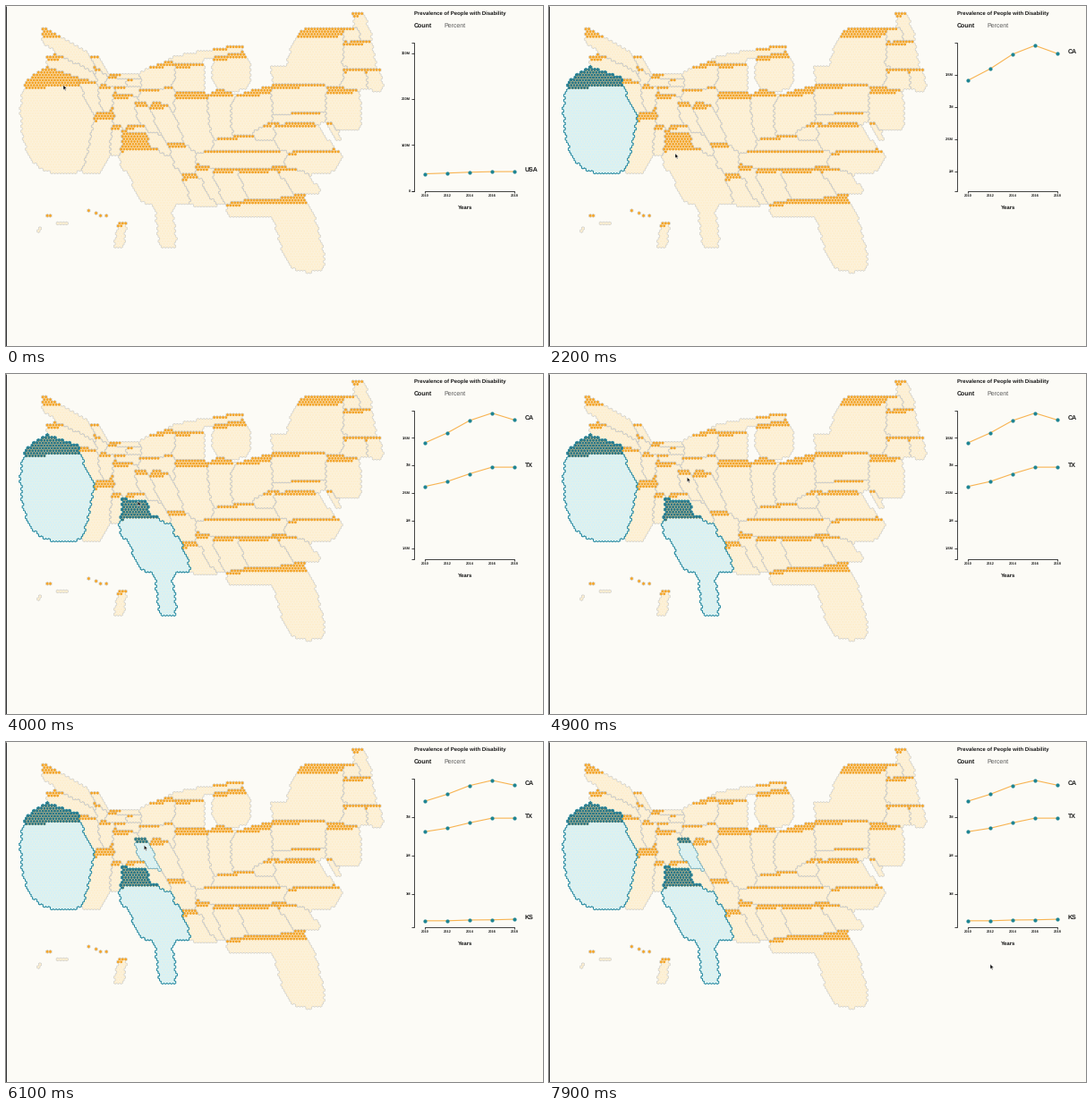
Write a matplotlib script that moves like this. It is 600 px wide and 380 px high and loops after 8 s.

```python
import numpy as np
import matplotlib.pyplot as plt
from matplotlib.animation import FuncAnimation
from matplotlib.patches import PathPatch, Polygon
from matplotlib.path import Path

W, H, DPI = 600, 380, 100
PX = 72 / DPI
BG, INK, ORANGE, TEAL = "#fcfbf6", "#161616", "#f3a52a", "#1f8593"
plt.rcParams.update({"font.family": "Liberation Sans", "text.hinting": "none",
                     "text.hinting_factor": 1})

fig = plt.figure(figsize=(W / DPI, H / DPI), dpi=DPI, facecolor=BG)
ax = fig.add_axes([0, 0, 1, 1])
ax.set(xlim=(0, W), ylim=(H, 0))
ax.axis("off")

# ---- hexagon grid in axial coordinates
DX = 3.3
DY = DX * np.sqrt(3) / 2
SIDES = [(1, 0), (0, 1), (-1, 1), (-1, 0), (0, -1), (1, -1)]
GRID = [(q, r) for r in range(1, 106) for q in range(-r // 2, 132 - r // 2)]


def center(q, r):
    return np.array([DX * (q + r / 2), DY * r])


CENTERS = np.array([center(*c) for c in GRID])
nearest = np.full(len(GRID), 1.03)
names = np.full(len(GRID), "", dtype="U5")


def blob(name, x0, y0, x1, y1, lean=0, tilt=0, power=5):
    """Claim cells in a rounded box: lean shifts its foot, tilt lowers its right end."""
    u, v = ((CENTERS - ((x0 + x1) / 2, (y0 + y1) / 2)) / (x1 - x0, y1 - y0)).T
    u, v = u - v * lean / (x1 - x0), v - u * tilt / (y1 - y0)
    reach = 2 * (abs(u) ** power + abs(v) ** power) ** (1 / power)
    won = reach < nearest
    nearest[won], names[won] = reach[won], name


# west
blob("CA", 18, 71, 101, 186, lean=8, power=2.5)
blob("WA", 41, 41, 103, 61, tilt=38)
blob("OR", 46, 62, 101, 78, tilt=18)
blob("NV", 86, 80, 104, 122, lean=16)
blob("AZ", 92, 111, 117, 187, lean=-16)
blob("UT", 104, 86, 119, 120)
blob("NM", 117, 132, 129, 168)
blob("ID", 100, 64, 112, 88, lean=8)
blob("MT", 98, 55, 110, 80, lean=14)
blob("WY", 110, 78, 134, 90)
blob("ND", 120, 76, 150, 82)
blob("SD", 134, 81, 152, 91)
blob("CO", 119, 94, 146, 136)
blob("NE", 122, 89, 150, 100, tilt=3)
blob("KS", 149, 107, 166, 147, lean=22)
blob("TX", 128, 138, 157, 185)
blob("TX", 139, 160, 198, 222, lean=24)
blob("TX", 168, 208, 187, 269, lean=8)
blob("OK", 134, 133, 161, 141)
blob("OK", 164, 139, 180, 169, lean=22)
# middle
blob("MN", 150, 66, 189, 92, tilt=-14)
blob("IA", 148, 92, 189, 108, tilt=3)
blob("MO", 168, 109, 191, 157, lean=20)
blob("WI", 188, 64, 222, 97)
blob("UP", 183, 50, 263, 59, tilt=-14)
blob("MI", 231, 52, 273, 94, power=3)
blob("IL", 193, 95, 230, 161, lean=14)
blob("IN", 225, 97, 252, 153, lean=2)
blob("OH", 252, 95, 297, 140, tilt=-14)
# south
blob("AR", 183, 153, 211, 186, lean=10, tilt=6)
blob("LA", 201, 186, 230, 224, lean=16)
blob("MS", 216, 177, 236, 222, lean=18)
blob("AL", 236, 184, 264, 221, lean=14)
blob("GA", 264, 179, 317, 217, lean=18, tilt=-6)
blob("SC", 306, 176, 340, 209, lean=30)
blob("NC", 309, 162, 371, 187, lean=-14)
blob("TN", 214, 162, 316, 181)
blob("KY", 229, 147, 300, 163, tilt=2)
blob("FL", 248, 216, 320, 236)
blob("FL", 304, 212, 349, 296, lean=22, power=3.5)
# east
blob("WV", 278, 132, 304, 151, tilt=-10)
blob("VA", 297, 130, 357, 163, lean=24)
blob("MD", 298, 118, 358, 131, tilt=-4)
blob("DE", 362, 129, 371, 151, lean=12)
blob("PA", 297, 85, 358, 124, tilt=-4)
blob("NJ", 357, 89, 396, 139, lean=4, power=3.5)
blob("NY", 317, 25, 376, 88, lean=-18)
blob("NY", 298, 66, 384, 89, lean=6)
blob("ME", 391, 8, 405, 38, lean=10)
blob("VT", 376, 25, 396, 41)
blob("MA", 376, 38, 411, 69, lean=6)
blob("CT", 374, 69, 403, 93)
blob("RI", 403, 70, 420, 94, lean=4)
# islands
blob("AK", 123, 242, 133, 270, lean=-4)
blob("isles", 57, 241, 68, 245, tilt=2)
blob("isles", 34, 248, 39, 254, lean=-3)
for i in range(4):
    blob("HI", 46 + 2 * i, 234 - i, 48 + 2 * i, 236 - i)
    blob("HI", 91 + 7 * i, 228 + 2 * i, 94 + 7 * i, 231 + 2 * i)

owner = {c: str(n) for c, n in zip(GRID, names) if n}

# close slivers between neighbours
for _ in range(3):
    for q, r in GRID:
        near = [owner[q + a, r + b] for a, b in SIDES if (q + a, r + b) in owner]
        if (q, r) not in owner and len(near) > 3:
            owner[q, r] = max(sorted(set(near)), key=near.count)

# the share with a disability fills each state from its top
SHARE = {"HI": 1, "isles": 0}
top = set()
for name in sorted(set(owner.values())):
    cells = sorted((c for c in owner if owner[c] == name), key=lambda c: (c[1], c[0]))
    top.update(cells[:int(np.ceil(SHARE.get(name, 0.13) * len(cells)))])


def corner(c, k, size=1.0):
    a = np.radians(60 * k - 30)
    return center(*c) + size * DX / np.sqrt(3) * np.array([np.cos(a), np.sin(a)])


def cells_path(cells, size=0.86):
    polys = [Path([corner(c, k, size) for k in range(7)], closed=True) for c in cells]
    return Path.make_compound_path(*polys)


def border_path(cells):
    pts = []
    for q, r in cells:
        for k, (a, b) in enumerate(SIDES):
            if owner.get((q + a, r + b)) != owner[q, r]:
                pts += [corner((q, r), k), corner((q, r), k + 1)]
    return Path(pts, [Path.MOVETO, Path.LINETO] * (len(pts) // 2))


def draw_cells(cells, light, dark, edge, width, z):
    lit = [c for c in cells if c in top]
    dim = [c for c in cells if c not in top]
    parts = [PathPatch(cells_path(dim, 0.92), fc=light, lw=0, zorder=z),
             PathPatch(border_path(cells), fc="none", ec=edge, lw=width * PX, zorder=z + 1,
                       capstyle="round"),
             PathPatch(cells_path(lit), fc=dark, lw=0, zorder=z + 2)]
    for p in parts:
        ax.add_patch(p)
    return parts


draw_cells(list(owner), "#fdeecf", ORANGE, "#d0cfca", 0.6, 1)
picks = [draw_cells([c for c in owner if owner[c] == n], "#d6f1f5", "#27788b", "#2f8fa5", w, 5)
         for n, w in (("CA", 0.9), ("TX", 0.9), ("KS", 0.4))]


# ---- chart
def text(x, y, s, size=6.5, bold=True, color=INK, ha="left", **kw):
    return ax.text(x, y, s, size=size * PX, weight="bold" if bold else "normal",
                   color=color, ha=ha, va="center", **kw)


def rule(xs, ys, color=INK, width=0.8, **kw):
    return ax.plot(xs, ys, color=color, lw=width * PX, solid_capstyle="butt", **kw)[0]


TOP, BASE = 41, 206.5
XS = np.linspace(468, 568, 5)
text(456, 8, "Prevalence of People with Disability", 6.4)
text(456, 22.5, "Count", 6.6)
text(489, 22.5, "Percent", 6.7, bold=False, color="#555555")
text(513.5, 225.5, "Years", 6.4, ha="center")
rule([453, 456, 456, 453], [TOP, TOP, BASE, BASE])
rule([468, 468, 568, 568], [BASE + 2, BASE, BASE, BASE + 2])
for x, year in zip(XS, range(2010, 2020, 2)):
    text(x, 212, str(year), 4.3, ha="center")
rule([0, 0], [0, H], "#333333", 1)
rule([0, W], [H, H], "#555555", 1)

# millions of people
DATA = {"USA": (37.1, 38.7, 40.6, 41.8, 42), "CA": (3.41, 3.59, 3.815, 3.95, 3.825),
        "TX": (2.62, 2.71, 2.85, 2.97, 2.97), "KS": (0.31, 0.31, 0.33, 0.335, 0.35)}
VIEWS = [["USA"], ["CA"], ["CA", "TX"], ["CA", "TX", "KS"]]
CLICKS, FADE = (0, 2700, 5300), 200
live = []


def ease(u):
    u = min(max(u, 0), 1)
    return u * u * (3 - 2 * u)


def domain(view):
    if view == ["USA"]:
        return 0, 324
    values = [v for n in view for v in DATA[n]]
    return min(values) / 2, max(values) * 1.011


def scale(view, v):
    lo, hi = domain(view)
    return BASE - (np.asarray(v) - lo) / (hi - lo) * (BASE - TOP)


def ticks(view):
    lo, hi = domain(view)
    raw = (hi - lo) / 4
    unit = 10 ** np.floor(np.log10(raw))
    step = unit * max(m for m, least in ((1, 1), (2, 2 ** 0.5), (5, 10 ** 0.5), (10, 50 ** 0.5))
                      if raw / unit >= least)
    return np.arange(np.ceil(lo / step), hi / step) * step


def draw_ticks(view, alpha):
    for v in ticks(view):
        y = scale(view, v)
        live.append(rule([453, 456], [y, y], alpha=alpha))
        live.append(text(452, y, f"{v:g}M" if v else "0", 4.3, ha="right", alpha=alpha))


def draw_series(name, ys, alpha):
    live.append(rule(XS, ys, "#f8b350", 1.1, alpha=alpha))
    live.extend(ax.plot(XS, ys, "o", ms=4.2 * PX, mfc=TEAL, mew=0, alpha=alpha))
    live.append(text(580, ys[-1] - 2, name, 6.6, alpha=alpha))


def draw_chart(stage):
    k = min(int(stage), len(VIEWS) - 2)
    f = stage - k
    a, b = VIEWS[k], VIEWS[k + 1]
    for view, alpha in ((a, 1 - f), (b, f)):
        if alpha > 0:
            draw_ticks(view, alpha)
    for name in sorted({*a, *b}):
        old, new = (scale(v if name in v else w, DATA[name]) for v, w in ((a, b), (b, a)))
        alpha = (1 - f) * (name in a) + f * (name in b)
        if alpha > 0:
            draw_series(name, (1 - f) * old + f * new, alpha)


# ---- pointer: time, x, y
ARROW = np.array([(0, 0), (0, 5.4), (1.2, 4.3), (2.1, 6.3), (3, 5.9), (2.1, 4), (3.8, 3.9)])
STOPS = np.array([(1200, 64, 88.3), (2000, 141, 165), (2700, 141, 164), (3600, 141.5, 163.5),
                  (4500, 154.3, 115.3), (6900, 154.3, 115.3), (7500, 400, 306),
                  (7700, 468, 303), (7900, 493, 248.3)])
pointer = ax.add_patch(Polygon(ARROW, fc="black", ec="white", lw=0.4 * PX, zorder=20))


def update(i):
    t = i * 100
    steps = [ease((t - c) / FADE) for c in CLICKS]
    while live:
        live.pop().remove()
    draw_chart(sum(steps))
    for parts, alpha in zip(picks, steps):
        for p in parts:
            p.set_alpha(alpha)
            p.set_visible(alpha > 0)
    pointer.set_xy(ARROW + [np.interp(t, STOPS[:, 0], STOPS[:, j]) for j in (1, 2)])
    return []


anim = FuncAnimation(fig, update, frames=80, interval=100, repeat=True, repeat_delay=0)
plt.show()
```
